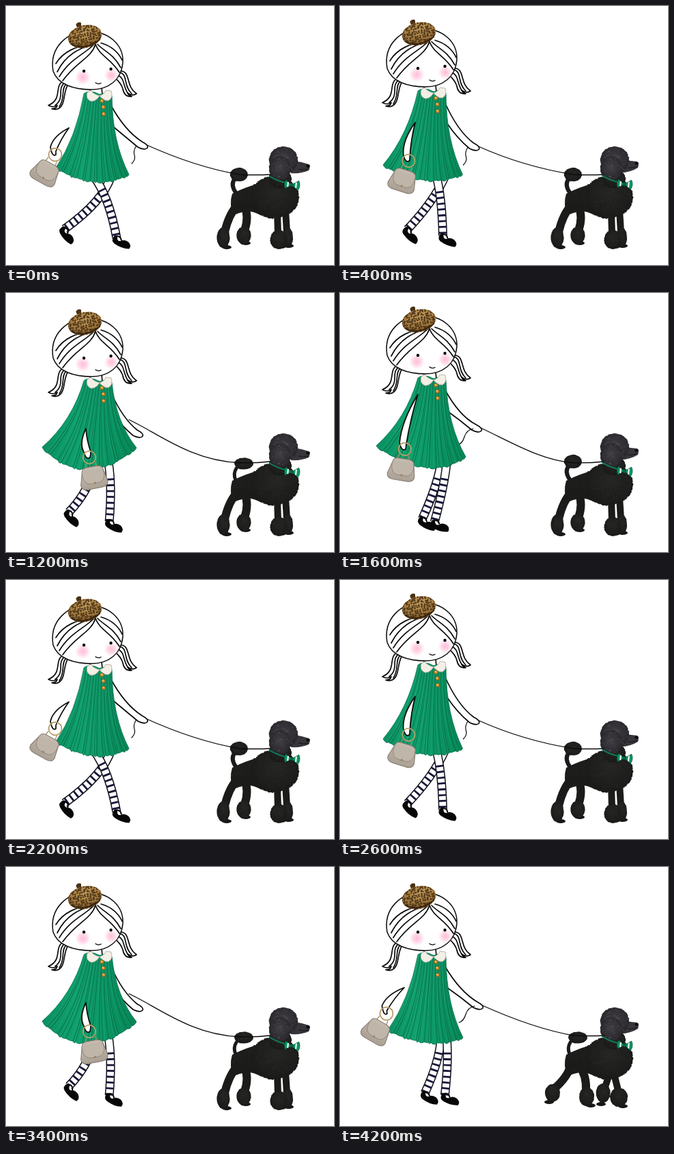
An HTML page that plays this animation: 480 px wide and 378 px high, repeating every 4400 ms.

```html
<!DOCTYPE html>
<html lang="en">
<head>
<meta charset="utf-8">
<title>Walking the poodle</title>
<style>
html, body { margin: 0; width: 100%; height: 100%; overflow: hidden; background: #fff; }
svg { display: block; width: 480px; height: 378px; }
.ink { fill: none; stroke: #0b0b0b; stroke-width: 1.7; stroke-linecap: round; stroke-linejoin: round; }
.skin { fill: #fff; }
</style>
</head>
<body>
<svg viewBox="0 0 480 378">
  <defs>
    <linearGradient id="cloth">
      <stop offset="0" stop-color="#0b8f61"/><stop offset=".35" stop-color="#0fa06d"/>
      <stop offset=".65" stop-color="#0a9665"/><stop offset="1" stop-color="#078556"/>
    </linearGradient>
    <radialGradient id="fur" cx=".52" cy=".4" r=".6">
      <stop offset="0" stop-color="#252524"/><stop offset=".7" stop-color="#1d1d1c"/><stop offset="1" stop-color="#191918"/>
    </radialGradient>
    <radialGradient id="greyFur" cx=".5" cy=".45" r=".6">
      <stop offset="0" stop-color="#403d44"/><stop offset="1" stop-color="#252327"/>
    </radialGradient>
    <radialGradient id="blush">
      <stop offset="0" stop-color="#ffbdd8"/><stop offset=".5" stop-color="#ffcfe2" stop-opacity=".8"/>
      <stop offset="1" stop-color="#ffe2ee" stop-opacity="0"/>
    </radialGradient>
    <radialGradient id="felt" cx=".55" cy=".3" r=".75">
      <stop offset="0" stop-color="#c09a5c"/><stop offset=".6" stop-color="#a37a3e"/><stop offset="1" stop-color="#5c4120"/>
    </radialGradient>
    <linearGradient id="leather" x2="0" y2="1">
      <stop offset="0" stop-color="#c6bcb0"/><stop offset="1" stop-color="#aaa094"/>
    </linearGradient>
    <filter id="soft"><feGaussianBlur stdDeviation=".6"/></filter>
    <clipPath id="cap"><ellipse rx="25" ry="16.500"/></clipPath>
    <g id="beret">
      <path d="M-8-14L-9-20Q-5-24-1-21L-2-14Z" fill="#4a3114"/>
      <ellipse rx="25" ry="16.500" fill="url(#felt)"/>
      <g id="spots" clip-path="url(#cap)"/>
      <path d="M-23 6Q-4 21 21 9" fill="none" stroke="#2b1807" stroke-width="1.3"/>
    </g>
  </defs>

  <g id="dog" filter="url(#soft)"/>
  <path id="leash" class="ink" style="stroke-width:1.3"/>
  <g id="ribbon">
    <path d="M385 248Q397 256 414 259" fill="none" stroke="#0b8157" stroke-width="2"/>
    <g transform="rotate(6 418 261)">
      <path d="M418 261L409 255Q406 261 409 267ZM418 261L428 254Q432 261 428 268Z" fill="#0f9463" stroke="#07573a" stroke-width=".7"/>
      <path d="M412.500 257.500V264.500M424.500 257V265" stroke="#fff" stroke-width="2"/>
      <circle cx="418.500" cy="261" r="2.500" fill="#08633f"/>
    </g>
  </g>

  <g id="legs"></g>
  <path id="lead" class="ink skin"/>
  <path id="loop" class="ink" style="stroke-width:1.2"/>
  <path id="armBack" class="ink skin"/>
  <g id="neck"><path class="ink skin" d="M123 119L123 130L141 130L140 119"/></g>
  <path id="dress" fill="url(#cloth)" stroke="#07704a" stroke-width=".8" stroke-linejoin="round"/>
  <path id="shade" fill="none" stroke="#045f3e" stroke-width="1.1" opacity=".6"/>
  <path id="shine" fill="none" stroke="#35bb8c" stroke-width=".9" opacity=".35"/>
  <path id="armFront" class="ink skin"/>
  <g id="trim">
    <path d="M119 126Q116 135 124 139Q131 140 137 131Q128 129 124 123ZM137 131Q143 139 150 138Q157 134 154 124L146 123Q144 129 137 131Z" fill="#f4efe6" stroke="#b9b0a2" stroke-width=".9"/>
    <g id="buttons"/>
  </g>
  <g id="bag">
    <path d="M-14 17Q-12 14-7 14L9 14Q14 15 16 18L20 38Q20 46 10 46L-10 46Q-20 46-20 38Z" fill="url(#leather)" stroke="#7f766b" stroke-width="1"/>
    <path d="M-15 19Q-17 34-8 38Q1 40 10 38Q19 34 16 19" fill="#bfb5a8" stroke="#8c8276" stroke-width=".8"/>
    <path d="M-8 15L-7 8M8 15L7 8" stroke="#a08d6d" stroke-width="1.3"/>
    <circle r="9.500" fill="none" stroke="#a48752" stroke-width="1.6"/>
    <circle r="9" fill="none" stroke="#e2cd9c" stroke-width=".6"/>
    <circle cx="1" cy="38" r="1.500" fill="#9b8357"/>
  </g>

  <g id="headSide">
    <g class="ink">
      <path class="skin" d="M85 109C69 116 84 136 62 145Q69 149 75 145Q74 150 67 150Q80 154 84 139C86 131 86 122 91 114Z"/>
      <path d="M86 112C74 120 87 134 72 145M88 114C80 122 87 134 78 147"/>
      <path class="skin" d="M163 95C185 92 173 116 191 128Q185 132 178 127Q180 131 184 132Q173 133 171 121C169 114 165 110 160 105Z"/>
      <path d="M166 97C179 99 171 116 184 128M164 101C174 106 171 116 178 127"/>
      <path class="skin" style="stroke-width:1.500" d="M69 95C63 60 90 37 120 37C150 37 172 56 171 82C169 108 150 122 125 122C100 122 76 115 69 95Z"/>
      <path d="M131 56C124 77 104 80 83 109M129 56C114 71 95 76 78 103M126 56C108 62 88 70 75 96M123 57C104 58 84 66 73 84"/>
      <path d="M131 56C137 73 153 76 166 97M134 56C145 67 157 70 168 90M139 54C153 58 163 65 170 79"/>
    </g>
    <circle cx="112.500" cy="104" r="12" fill="url(#blush)"/>
    <circle cx="154" cy="101" r="11" fill="url(#blush)"/>
    <circle cx="114" cy="95" r="2.200"/><circle cx="153.500" cy="92" r="2.200"/>
    <path class="ink" style="stroke-width:1.400" d="M131 112Q135 115 139 112.500"/>
    <use href="#beret" transform="translate(115.500 44.500) rotate(-13)"/>
  </g>

  <g id="headFront">
    <g class="ink">
      <path class="skin" d="M84 102C67 106 72 126 80 136C87 144 84 148 81 150Q88 157 92 148Q95 152 101 148C92 140 102 128 96 116Q93 106 84 102Z"/>
      <path d="M83 106C72 114 82 128 86 137Q89 144 87 152M87 108C82 120 96 132 92 148"/>
      <path class="skin" d="M163 102C179 104 178 122 172 132C167 141 169 146 173 149Q166 153 163 146Q160 150 157 147C163 140 151 130 155 118Q158 108 163 102Z"/>
      <path d="M166 107C178 114 165 130 164 138Q164 144 167 150M163 108C170 119 156 130 163 146"/>
      <path class="skin" style="stroke-width:1.500" d="M74 84C73 57 96 38 125 38C155 38 176 56 175 83C172 108 151 122 124 122C97 122 76 108 74 84Z"/>
      <path d="M119 56C115 76 96 80 84 104M117 56C106 70 90 76 79 98M113 56C98 61 84 70 76 88M109 56C95 57 84 64 77 77"/>
      <path d="M119 56C128 75 152 78 165 104M122 56C136 70 158 72 170 97M127 56C145 60 164 68 173 88M133 55C150 55 166 64 173 77"/>
    </g>
    <circle cx="96" cy="103.500" r="12" fill="url(#blush)"/>
    <circle cx="151" cy="102.500" r="12" fill="url(#blush)"/>
    <circle cx="98" cy="94" r="2.200"/><circle cx="138.500" cy="94" r="2.200"/>
    <path class="ink" style="stroke-width:1.400" d="M115.500 111.500Q119.500 113.500 123.500 111.500"/>
    <use href="#beret" transform="translate(131 43.500) scale(-1 1) rotate(-13)"/>
  </g>
</svg>

<script>
const $ = id => document.getElementById(id);
const set = (id, k, v) => $(id).setAttribute(k, v);
const show = (id, on) => set(id, 'display', on ? 'inline' : 'none');
const mix = (a, b, u) => a + (b - a) * u;
const n = v => v.toFixed(1);
let seed = 7;
const rnd = () => (seed = (seed * 16807) % 2147483647) / 2147483647;

// Fluffy ellipse with a ragged rim and faint curls
function fluff(x, y, rx, ry, fill = 'fur') {
  const count = Math.round((rx + ry) * 2.2);
  let rim = '', curls = '';
  for (let k = 0; k < count; k++) {
    const a = k / count * Math.PI * 2, r = .97 + rnd() * .06;
    rim += (k ? 'L' : 'M') + n(x + Math.cos(a) * rx * r) + ' ' + n(y + Math.sin(a) * ry * r);
  }
  for (let k = 0; k < rx * ry / 9; k++) {
    const a = rnd() * 6.283, r = Math.sqrt(rnd()) * .85;
    curls += `M${n(x + Math.cos(a) * rx * r)} ${n(y + Math.sin(a) * ry * r)}q1.500-1.500 2.500.5`;
  }
  const tone = fill === 'fur' ? '#3c3c3b' : '#77727d';
  return `<path d="${rim}Z" fill="url(#${fill})"/>` +
    `<path d="${curls}" fill="none" stroke="${tone}" stroke-width=".7" opacity=".4"/>`;
}

const limb = (d, w) => `<path d="${d}" fill="none" stroke="#1b1b1a" stroke-width="${w}" stroke-linecap="round"/>`;
const paw = (x, y) => `<ellipse cx="${x}" cy="${y}" rx="7" ry="3" fill="#171716"/>`;

function buildDog() {
  $('dog').innerHTML =
    `<g id="tailUp">${limb('M336 272Q328 260 335 252', 6)}${fluff(341, 246, 13, 10)}</g>` +
    `<g id="tailOver">${limb('M336 273Q332 264 337 256', 5)}${fluff(348, 249, 14, 8.5)}</g>` +
    '<path d="M331 274Q350 264 374 258L374 306Q358 298 350 300Q340 302 333 305Q326 290 331 274Z" fill="#1d1d1c"/>' +
    `<g id="stand">${limb('M339 290Q326 304 320 330', 12)}${limb('M349 292Q356 308 349 328', 12)}` +
    limb('M397 300L398 332', 10) + limb('M409 298L411 330', 10) +
    paw(323, 352) + paw(351, 346) + paw(403, 351) + paw(414, 350) +
    fluff(318, 338, 9.5, 15) + fluff(348, 335, 10.5, 13) + fluff(412, 338, 8, 15) + fluff(399, 341, 12.5, 14) + '</g>' +
    `<g id="walk">${limb('M338 288Q334 306 313 324', 12)}${limb('M350 290Q361 304 360 326', 12)}` +
    limb('M395 300L387 324', 10) + limb('M400 298L407 326', 10) +
    paw(306, 343) + paw(367, 348) + paw(382, 346) + paw(414, 349) +
    fluff(311, 330, 11, 13) + fluff(361, 335, 11, 14) + fluff(385, 330, 10.5, 14) + fluff(408, 336, 13, 14) + '</g>' +
    fluff(371, 280, 21, 21) + fluff(393, 279, 35.5, 31) + fluff(401, 252, 17, 14) +
    `<g id="dogHead"><g id="muzzle">
      <path d="M416 225Q430 227 443 231Q446 235 443 240Q432 245 417 244Z" fill="#37343a"/>
      <path d="M428 238Q436 240 442 238" stroke="#151416" fill="none"/>
      <ellipse cx="442" cy="233.500" rx="2.800" ry="2.300" fill="#0d0d0e"/>
      <circle cx="424" cy="230" r="1.500" fill="#09090a"/></g>` +
    fluff(406, 225, 21, 20, 'greyFur') + fluff(401, 237, 16, 18, 'greyFur') + '</g>';
}

function buildSpots() {
  let out = '';
  for (let y = -16; y < 18; y += 3.5)
    for (let x = -26; x < 27; x += 3.7) {
      const cx = n(x + rnd() * 2.4), cy = n(y + rnd() * 2.4), r = n(.8 + rnd() * .5);
      out += `<circle cx="${cx}" cy="${cy}" r="${r}" fill="#87602c" stroke="#2a1a0a" stroke-width=".9" stroke-dasharray="${n(2.5 + rnd() * 2)} 1.200"/>`;
    }
  $('spots').innerHTML = out;
}

// Key poses of the eleven-step walk.
// ring: x, y, tilt; hem: left, middle, right; legs: hip x, knee x, foot x, foot y, foot tilt
const poses = {
  0:  { ring: [72, 217, 29], arm: [92, 178], hand: [207, 206], hem: [73, 236, 128, 256, 180, 246], back: [154, 131, 90, 335, 48], front: [128, 148, 170, 345, 22] },
  4:  { ring: [129, 235, 5], arm: [128, 162], hand: [200, 210], hem: [53, 228, 116, 251, 179, 246], back: [154, 133, 118, 335, 36], front: [154, 147, 147, 339, 24] },
  6:  { ring: [122, 240, -11], arm: [117, 198], hand: [200, 208], hem: [53, 225, 118, 257, 191, 226], back: [130, 117, 97, 329, 44], front: [150, 153, 159, 340, 24] },
  8:  { ring: [95, 228, 9], arm: [114, 148], hand: [207, 200], hem: [53, 223, 124, 254, 184, 239], back: [148, 138, 128, 337, 26], front: [156, 150, 147, 340, 16] },
  10: { ring: [68, 214, 30], arm: [94, 176], hand: [209, 205], hem: [70, 238, 128, 256, 180, 249], back: [148, 141, 132, 337, 24], front: [156, 157, 162, 339, 18] }
};
const keys = [0, 4, 6, 8, 10];
const bob = [0, -2, -4, 0, -1, 0, 0, -2, -4, 0, 0];

function poseAt(s) {
  const a = keys.filter(k => k <= s).pop(), b = keys.find(k => k >= s);
  const u = a === b ? 0 : s === 9 ? .75 : (s - a) / (b - a), out = {};
  for (const part in poses[a]) out[part] = poses[a][part].map((v, j) => mix(v, poses[b][part][j], u));
  return out;
}

function legMarkup([hip, knee, fx, fy, tilt]) {
  const r = tilt * Math.PI / 180, c = Math.cos(r), s = Math.sin(r);
  const ax = fx - 10 * c + 3 * s, ay = fy - 10 * s - 3 * c;
  const qx = 2 * knee - (hip + ax) / 2, qy = 2 * 286 - (248 + ay) / 2;
  const d = `M${n(hip)} 248Q${n(qx)} ${n(qy)} ${n(ax)} ${n(ay)}`;
  const line = (w, col, extra = '') => `<path d="${d}" fill="none" stroke="${col}" stroke-width="${w}" ${extra}/>`;
  return line(13, '#101018') + line(10, '#fff') +
    line(11, '#17173a', `stroke-dasharray="0 23${' 2.800 5.700'.repeat(16)}"`) +
    `<g transform="translate(${n(fx)} ${n(fy)}) rotate(${n(tilt)})"><path d="M-14-5Q-17 4-10 6Q3 9 13 5Q15-1 8-4Q1-6-3-1Q-8 2-10-6Z" fill="#070707"/>` +
    '<path d="M-13-4Q-6-9-2-2" fill="none" stroke="#070707" stroke-width="2"/></g>';
}

function drawDress([lx, ly, mx, my, rx, ry], dy) {
  const cx = 2 * mx - (lx + rx) / 2, cy = 2 * my - (ly + ry) / 2;
  const hem = u => [mix(mix(lx, cx, u), mix(cx, rx, u), u), mix(mix(ly, cy, u), mix(cy, ry, u), u)];
  const top = u => [mix(114, 155, u), 128 + dy + 3 * u];
  const flare = (114 - lx) * .22;
  const bend = u => {
    const t = top(u), h = hem(u);
    return `${n((t[0] + h[0]) / 2 + mix(flare, -12, u))} ${n((t[1] + h[1]) / 2 + 10)}`;
  };
  const fold = u => {
    const t = top(u), h = hem(u);
    return `M${n(t[0])} ${n(t[1])}Q${bend(u)} ${n(h[0])} ${n(h[1])}`;
  };
  const count = 18, at = k => (k + .3 * Math.sin(k * 2.4)) / (count + .3 * Math.sin(count * 2.4));
  let d = fold(0), dark = '', light = '';
  for (let k = 1; k <= count; k++) {
    const p = hem(at(k - .5)), q = hem(at(k));
    d += `Q${n(p[0])} ${n(p[1] + 3 + 2 * Math.sin(k * 1.9))} ${n(q[0])} ${n(q[1])}`;
    if (k < count) {
      dark += fold(at(k));
      light += fold(at(k - .4));
    }
  }
  const t = top(1);
  d += `Q${bend(1)} ${t[0]} ${n(t[1])}Q150 ${124 + dy} 137 ${129 + dy}Q122 ${121 + dy} 114 ${128 + dy}Z`;
  set('dress', 'd', d);
  set('shade', 'd', dark);
  set('shine', 'd', light);
}

function bagArm([x, y], [hx, hy]) {
  const ex = hx - 3, ey = hy - 8, len = Math.hypot(ex - x, ey - y) || 1;
  const px = -(ey - y) / len * 5, py = (ex - x) / len * 5;
  return `M${n(x)} ${n(y)}Q${n(mix(x, ex, .6) + px * 2.3)} ${n(mix(y, ey, .6) + py * 2.3)} ${n(ex + px)} ${n(ey + py)}` +
    `Q${n(hx - 2 + px * .6)} ${n(hy + 4)} ${n(hx + 1)} ${n(hy)}Q${n(ex - px)} ${n(ey - py + 4)} ${n(ex - px)} ${n(ey - py)}` +
    `Q${n(mix(x, ex, .5))} ${n(mix(y, ey, .5))} ${n(x)} ${n(y)}`;
}

function drawGirl(step) {
  const s = step % 11, p = poseAt(s), dy = bob[s], [hx, hy] = p.hand;
  const behind = s === 0 || s > 8, front = step === 4;
  $('legs').innerHTML = legMarkup(p.back) + legMarkup(p.front);
  drawDress(p.hem, dy);
  for (const id of ['neck', 'trim', 'headSide']) set(id, 'transform', `translate(0 ${dy})`);
  show('headFront', front);
  show('headSide', !front);
  set('armBack', 'd', bagArm(p.arm, p.ring));
  set('armFront', 'd', bagArm(p.arm, p.ring));
  show('armBack', behind);
  show('armFront', !behind);
  set('bag', 'transform', `translate(${n(p.ring[0])} ${n(p.ring[1])}) rotate(${n(p.ring[2])})`);
  set('lead', 'd', `M153 ${144 + dy}Q${n((155 + hx) / 2 - 7)} ${n((144 + hy) / 2 + 7)} ${n(hx - 8)} ${n(hy - 8)}` +
    `Q${n(hx + 2)} ${n(hy - 3)} ${n(hx)} ${n(hy + 1)}Q${n(hx - 4)} ${n(hy + 5)} ${n(hx - 14)} ${n(hy)}Q${n(hx - 32)} ${n(hy - 15)} 158 ${177 + dy}`);
  const taut = s === 6, sx = taut ? 180 : hx - 3, sy = taut ? 185 : hy - 4;
  const sag = s === 8 || taut ? 7 : 0;
  set('leash', 'd', `M${n(sx)} ${n(sy)}C${n(sx + 40)} ${n(sy + 18)} ${n(sx + 90)} ${238 + sag} 342 ${246 + sag / 4}Q365 ${247 + sag / 5} 386 246`);
  set('loop', 'd', s < 6
    ? `M${n(hx - 17)} ${n(hy - 1)}Q${n(hx - 21)} ${n(hy + 6)} ${n(hx - 19)} ${n(hy + 12)}T${n(hx - 23)} ${n(hy + 24)}`
    : `M${n(hx - 12)} ${n(hy - 2)}Q${n(hx - 22)} ${n(hy)} ${n(hx - 25)} ${n(hy + 10)}T${n(hx - 35)} ${n(hy + 22)}`);
  show('loop', !taut);
}

function drawDog(step) {
  const s = step % 11;
  const ahead = s === 0 || s === 6 || s === 7, up = s > 2 && s < 6;
  const walking = s % 2 === 1 || s === 10, tailUp = s === 0 || s === 2 || s === 8;
  show('stand', !walking);
  show('walk', walking);
  show('tailUp', tailUp);
  show('tailOver', !tailUp);
  set('dogHead', 'transform', `translate(${ahead ? 0 : -4} ${up ? 1 : 0})`);
  set('muzzle', 'transform', ahead ? '' : `translate(-4 0) rotate(${up ? -24 : -8} 415 231)`);
  set('ribbon', 'transform', ahead ? '' : 'translate(-2 -1)');
}

buildDog();
buildSpots();
$('buttons').innerHTML = [[140.5, 138.5], [142.5, 147.5], [143, 157.5]].map(([x, y]) =>
  `<circle cx="${x}" cy="${y}" r="2.800" fill="#c8963a" stroke="#755014" stroke-width=".8"/><circle cx="${x - .7}" cy="${y - .8}" r=".9" fill="#f6dc92"/>`).join('');

let last = -1;
function tick() {
  const step = Math.floor(performance.now() % 4400 / 200);
  if (step !== last) {
    drawGirl(step);
    drawDog(step);
    last = step;
  }
  requestAnimationFrame(tick);
}
tick();
</script>
</body>
</html>
```
